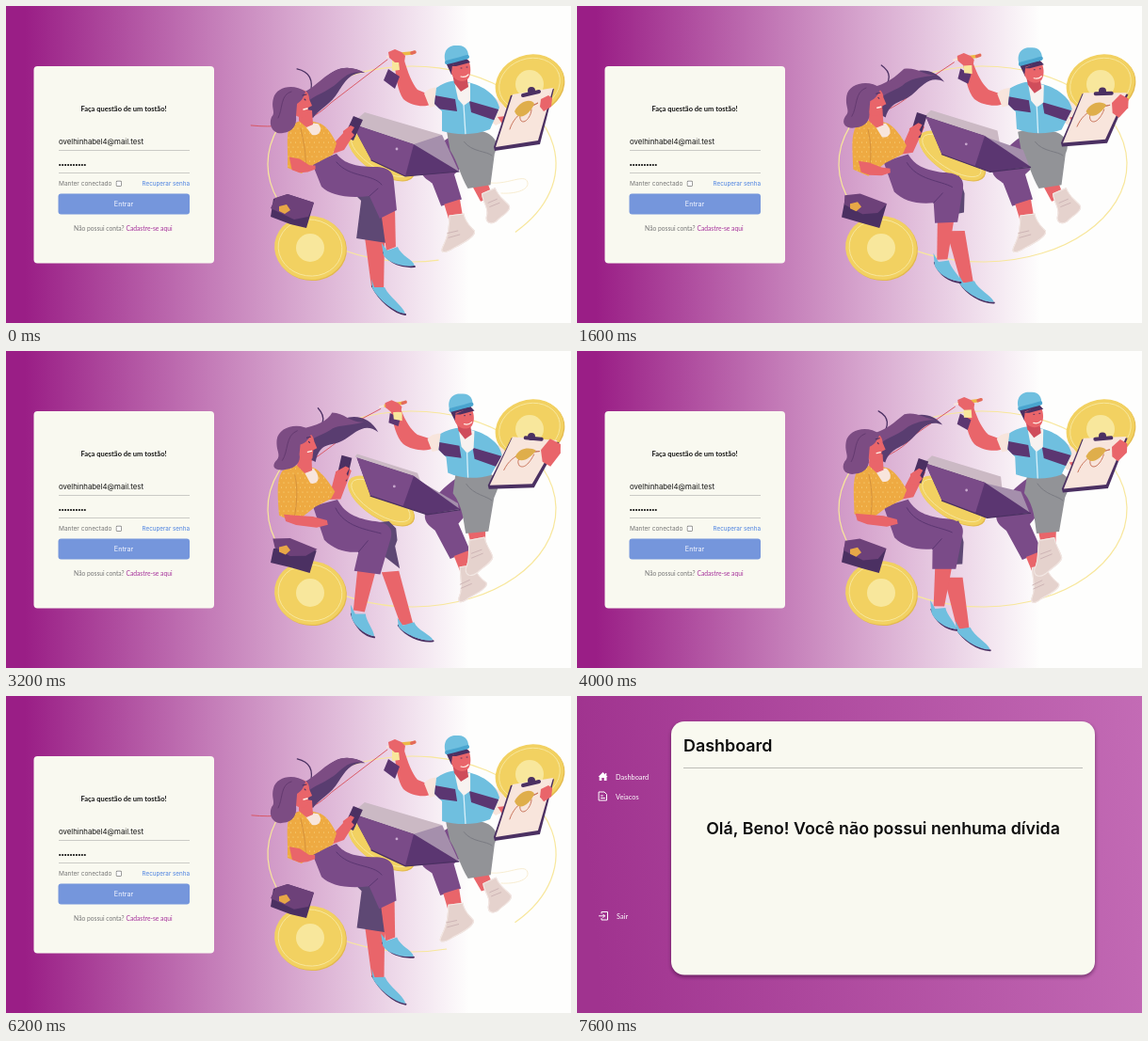
An HTML page with a canvas that plays this animation: 600 px wide and 337 px high, repeating every 8 s.

```html
<!DOCTYPE html>
<html lang="pt-BR">
<head>
<meta charset="utf-8">
<title>Login</title>
<style>
html, body { margin: 0; width: 100%; height: 100%; overflow: hidden; background: #fff; }
canvas { display: block; width: 600px; height: 337px; }
</style>
</head>
<body>
<canvas id="stage" width="600" height="337"></canvas>
<script>
const ctx = document.getElementById('stage').getContext('2d');
const LOOP = 8000, TICK = 200, DASHBOARD_AT = 7200, SWAY = 6000;
const C = {
  paper: '#f9f9f0', skin: '#e9656a', skinDark: '#cf4d5b', hair: '#7c4c83', night: '#4b3062',
  lock: '#593d70', plum: '#7a4b88', plumDark: '#5b3671', dusk: '#5e4874', orange: '#eeaa42',
  gold: '#f2d161', pale: '#f8e79c', sky: '#6fbfdf', cream: '#f8e5dc', gray: '#929397', shoe: '#e5d2cd'
};
const DISPLAY = 'Lato, sans-serif', ROUND = 'Inter, sans-serif';
const NUMBER = /-?[\d.]+/g;

// Cosine swing between 0 and 1, reaching 1 at `peak`; a higher `rest` lingers near 0.
const swing = (t, peak, rest = 1) => ((1 + Math.cos((t - peak) / SWAY * 2 * Math.PI)) / 2) ** rest;

// Blends two path strings that share one structure.
function morph(a, b, p) {
  const ends = b.match(NUMBER);
  let i = 0;
  return new Path2D(a.replace(NUMBER, n => +n + (ends[i++] - n) * p));
}

let pose = 0;
function fill(color, a, b = a) {
  const path = morph(a, b, pose);
  ctx.fillStyle = color;
  ctx.fill(path);
  return path;
}
function line(color, width, a, b = a) {
  ctx.strokeStyle = color;
  ctx.lineWidth = width;
  ctx.lineCap = ctx.lineJoin = 'round';
  ctx.stroke(morph(a, b, pose));
}
function inside(path, draw) {
  ctx.save();
  ctx.clip(path);
  draw();
  ctx.restore();
}
function oval(color, x, y, rx, ry = rx, turn = 0, stroke = 0) {
  ctx.beginPath();
  ctx.ellipse(x, y, rx, ry, turn, 0, 7);
  if (stroke) {
    ctx.strokeStyle = color;
    ctx.lineWidth = stroke;
    ctx.stroke();
  } else {
    ctx.fillStyle = color;
    ctx.fill();
  }
}
function box(color, x, y, w, h, r = 0) {
  ctx.beginPath();
  ctx.roundRect(x, y, w, h, r);
  ctx.fillStyle = color;
  ctx.fill();
}
function text(str, x, y, size, color, family, weight = 400, align = 'left') {
  ctx.font = `${weight} ${size}px ${family}`;
  ctx.textAlign = align;
  ctx.fillStyle = color;
  ctx.fillText(str, x, y);
}
function backdrop(x0, y0, x1, y1, from, to) {
  const g = ctx.createLinearGradient(x0, y0, x1, y1);
  g.addColorStop(0, from);
  g.addColorStop(1, to);
  box(g, 0, 0, 600, 337);
}

function coin(x, y, rx, ry, turn, mark) {
  oval('#e3b94d', x + 1, y + 1, rx, ry, turn);
  oval(C.gold, x, y, rx, ry, turn);
  oval(C.pale, x, y, rx - 4, ry - 4, turn, 1);
  if (mark) oval(C.pale, x, y, mark);
}

function orbit() {
  const gap = .62 * Math.max(0, 1 - pose * 4);
  ctx.strokeStyle = C.pale;
  ctx.lineWidth = 1.2;
  ctx.beginPath();
  ctx.ellipse(431, 168, 153, 104, 0, .77 + gap, .77 + Math.PI * 2);
  ctx.stroke();
  if (gap) line('#f5e6bd', .7, 'M505 185C525 196 552 175 554 188C555 196 540 200 526 199');
}

function thread() {
  line('#d9505a', .9,
    'M405 57L345 103C330 117 310 132 260 127',
    'M397 62C375 72 370 85 350 97C330 117 310 132 260 127');
}

function sneaker(a, b) {
  const path = fill(C.shoe, a, b);
  inside(path, () => line('#f3e8e4', 2, a, b));
}

function manLegs() {
  fill(C.plum,
    'M483 133C465 140 448 157 441 171C438 181 447 184 452 188L460 211L482 204L475 178L506 151Z',
    'M487 130C470 139 453 157 446 170C443 181 449 186 456 191L473 222L494 213L481 184L508 151Z');
  fill(C.skin, 'M463 209L480 204L483 224L468 227Z', 'M477 219L492 213L498 236L485 238Z');
  sneaker('M468 221L484 219C486 229 491 232 495 237C497 243 485 250 473 256C464 262 456 263 459 256C463 247 467 243 468 221Z',
    'M483 230L498 228C501 238 507 243 512 247C515 252 504 258 493 264C486 270 481 269 483 262C487 252 484 245 483 230Z');
  line('#cbb2b3', .9, 'M466 240L477 238M467 245L479 242', 'M484 249L494 244M485 253L496 248');
  fill(C.skin, 'M494 188L511 186L519 202L506 207Z', 'M489 187L509 187L508 209L494 212Z');
  sneaker('M508 199L522 192C527 203 534 205 539 211C541 217 532 221 525 228C518 232 513 228 515 221C517 213 509 208 508 199Z',
    'M490 201L507 198C509 209 514 213 515 220C514 226 504 231 498 237C490 243 484 239 485 232C490 222 488 213 490 201Z');
  line('#cbb2b3', .9, 'M516 208L525 204M518 212L528 208', 'M492 216L503 212M492 221L504 216');
  fill(C.gray,
    'M466 135C482 131 503 132 512 137C522 143 522 151 519 157L515 190L491 194C482 181 479 167 471 154Z',
    'M479 127C494 123 512 126 519 133C528 140 520 150 518 157L512 192L488 194C486 181 486 165 475 151Z');
  line('#7a7b82', 1, 'M486 145C494 156 511 154 516 159', 'M489 141C497 153 511 154 516 159');
}

function manTorso() {
  fill(C.skin,
    'M449 94L437 89C431 82 427 71 423 58L413 58C413 73 416 91 422 99C431 107 446 108 452 104Z',
    'M453 94L437 89C429 83 424 75 419 63L408 63C411 77 414 92 422 99C431 106 449 107 454 103Z');
  fill(C.cream, 'M460 87C452 86 447 89 444 93L450 108L463 104Z',
    'M466 88C457 87 451 89 448 94L453 107L467 104Z');
  fill(C.cream, 'M507 92C522 97 532 105 534 120L520 127L508 116Z',
    'M512 95C526 100 535 108 535 119L523 127L510 117Z');
  const vest = fill(C.sky,
    'M457 87C464 82 476 76 490 81C508 85 521 95 524 108L514 131C498 138 477 137 463 133L463 112L455 104Z',
    'M462 88C471 83 485 79 495 84C511 88 525 98 527 111L515 132C500 136 485 136 470 129L468 113L460 105Z');
  inside(vest, () => {
    fill(C.plumDark, 'M450 94L477 99L479 112L450 108Z', 'M455 96L482 101L484 114L455 110Z');
    fill(C.plumDark, 'M492 101L530 112L526 124L494 113Z', 'M496 103L533 114L529 126L498 115Z');
    fill('#f7f2f0', 'M476 80L493 82L493 101L486 106L480 99Z', 'M481 82L498 85L497 104L490 109L484 102Z');
    line('#d8f0fa', 1.3, 'M486 105L488 137', 'M490 108L491 137');
  });
}

function manHead() {
  fill(C.skinDark, 'M474 72L489 72L491 86L483 91L476 82Z', 'M479 75L493 75L495 89L488 94L481 85Z');
  fill(C.night, 'M467 60L490 53L486 68L473 73Z', 'M472 64L495 57L491 72L478 76Z');
  fill(C.skin, 'M474 63L491 57C494 65 494 72 491 77C485 83 475 79 473 71Z',
    'M478 66L495 61C498 69 498 75 495 80C489 86 479 82 477 74Z');
  fill(C.night, 'M472 64L489 56L493 60L478 64Z', 'M477 68L494 60L498 64L483 68Z');
  fill(C.sky, 'M467 60C463 48 470 41 479 42C488 41 492 48 491 56Z',
    'M472 64C468 52 475 45 484 46C493 45 497 51 496 59Z');
  line('#4aa5cf', 4, 'M468 60C476 58 484 56 490 54', 'M473 63C481 61 489 59 495 57');
  line(C.night, .9, 'M483 66L484 66M489 65L490 65', 'M487 69L488 69M493 68L494 68');
  line('#fff3ea', 1.2, 'M483 75C486 76 489 75 491 73', 'M487 78C490 79 493 78 495 76');
}

function manTools() {
  fill(C.plumDark, 'M406 67L418 75L413 88L401 79Z', 'M408 66L419 71L417 79L407 76Z');
  fill(C.pale, 'M410 57L417 59L418 68L410 69Z', 'M411 64L421 66L421 75L412 73Z');
  line('#edb946', 3.5, 'M409 52L431 50', 'M402 59L419 56');
  line('#e46b59', 3.5, 'M431 50L434 49', 'M420 56L423 55');
  line(C.cream, 2, 'M405 54L408 53', 'M396 60L400 59');
  fill(C.skin, 'M406 49L413 46L420 49L424 53L423 60L413 60L407 55Z',
    'M402 56L409 53L416 56L420 60L419 65L409 66L403 61Z');

  fill(C.skin, 'M522 118L531 117L538 124L538 130L529 128Z', 'M524 119L533 117L540 125L538 132L529 129Z');
  fill(C.night, 'M536 95L582 88L567 147L519 154L518 150Z', 'M537 92L588 98L560 145L512 146L511 142Z');
  fill(C.cream, 'M538 94L581 87L565 143L520 150Z', 'M538 91L586 96L558 141L513 142Z');
  line('#c9765d', 1, 'M535 131C541 112 559 107 565 103C554 108 542 114 547 122C551 126 558 117 558 110',
    'M528 126C538 106 556 107 567 107C553 108 539 113 545 122C551 126 557 117 561 110');
  fill('#dfae4b', 'M540 112C546 100 558 98 561 104C557 114 545 124 540 112Z',
    'M541 112C546 102 557 103 563 106C557 114 546 121 541 112Z');
  line(C.night, 4, 'M549 95L566 91', 'M552 92L569 94');
  oval(C.night, 558, 90 + pose, 4);
  fill(C.skin, 'M568 99L576 95L580 98L579 107L571 112L567 107Z',
    'M568 106L578 93L590 99L590 109L579 124L570 119Z');
}

function laptop() {
  fill('#cbb9c4', 'M381 113L463 137L456 165L433 149L366 126Z', 'M372 109L434 129L451 172L433 131L371 111Z');
  fill('#a58fac', 'M433 147L463 137L481 176L446 178Z', 'M431 132L482 165L481 169L448 172Z');
  const lid = fill(C.plumDark, 'M367 125L433 147L481 176L424 181L388 164Z', 'M373 112L433 131L482 167L450 173L387 153Z');
  inside(lid, () => fill(C.plum, 'M367 125L433 147L424 181L388 164Z', 'M373 112L433 131L421 164L387 153Z'));
  line(C.night, 1.2, 'M388 164L424 181L481 176', 'M387 153L450 173L482 168');
  oval('#c8a8ce', 415 - 3 * pose, 152 - 9 * pose, 1.4);
}

function pump(a, b, sole, soleB) {
  line(C.night, 2, sole, soleB);
  fill(C.sky, a, b);
}

function womanLegs(nearPose, farPose) {
  pose = farPose;
  fill(C.skin, 'M381 246L402 248L401 301L388 299Z', 'M401 234L419 232L436 289L423 291Z');
  pump('M388 290L391 299L402 299C407 310 420 317 424 327C411 326 393 309 389 300Z',
    'M419 283L425 291L437 287C441 296 454 299 457 305C444 308 424 298 420 292Z',
    'M389 298C396 312 411 326 424 328', 'M420 291C427 301 443 308 457 306');
  fill(C.dusk, 'M360 190L404 180L407 218L403 252L372 247L377 207Z',
    'M360 185L407 181C415 185 417 195 418 203L423 234L395 241L380 205Z');
  pose = nearPose;
  fill(C.skin, 'M398 217L413 212L414 256L404 260Z', 'M373 229L393 231L380 278L368 276Z');
  pump('M399 252L405 260L416 256C420 266 432 269 434 276C420 278 405 272 401 265Z',
    'M365 270L370 280L381 280C381 287 390 298 390 304C379 302 368 292 366 283Z',
    'M401 262C408 274 421 278 434 277', 'M366 280C370 294 379 303 390 305');
  fill(C.plum,
    'M325 167L351 157C358 166 367 170 388 171C407 170 412 177 412 188L415 217L397 226L386 202C362 205 344 201 335 192Z',
    'M326 165L352 158C359 171 368 177 389 181C407 182 412 190 408 201L397 238L369 234L374 214C360 215 348 211 338 201Z');
  line(C.plumDark, 1, 'M351 166C365 183 390 178 399 190M386 202L395 194',
    'M350 167C359 187 383 190 398 194M374 214L384 202');
}

function dots() {
  for (let y = 120; y < 184; y += 5)
    for (let x = 285 + y % 2 * 2.5; x < 360; x += 5) oval('#f8d887', x, y, .6);
}

function forearm() {
  fill(C.skin, 'M301 160L312 162L322 169L328 169L328 173L320 176L312 177L304 174Z',
    'M295 174L307 175L326 176L341 180L342 185L330 188L308 185L297 181Z');
}

function womanTorso() {
  fill(C.skin, 'M337 142L349 145L360 133L368 126L373 131L359 153L345 158Z',
    'M332 135L345 147L349 128L360 120L366 127L355 158L341 158Z');
  const jacket = fill(C.orange,
    'M301 128L316 120L334 125C342 129 347 138 351 146L347 158L326 169L314 178L299 172C300 152 297 140 301 128Z',
    'M293 127L312 120L328 125C335 130 344 141 349 150L345 157L329 165L306 183L289 175C287 151 286 136 293 127Z');
  inside(jacket, dots);
  line('#cf8b39', .8, 'M313 130C317 148 319 160 318 170', 'M306 132C310 148 307 164 305 178');
  fill(C.cream, 'M315 124L331 125C338 131 332 139 325 137Z', 'M314 124L326 125C336 136 330 143 323 141Z');
  fill(C.skin, 'M311 109L325 111L326 126L319 129L311 122Z', 'M310 105L324 108L325 127L317 130L309 122Z');
}

function womanHair() {
  fill(C.lock,
    'M312 96C327 93 334 77 349 69C360 63 372 66 381 71C366 70 360 80 353 91C345 105 332 110 326 119C318 116 314 108 312 96Z',
    'M312 84C330 80 338 91 350 80C363 65 387 68 397 88C383 76 373 87 361 94C346 103 334 92 329 118C316 112 311 99 312 84Z');
  line(C.night, 1.3, 'M309 67C322 70 327 78 323 94', 'M334 60C342 70 341 80 321 91');
  fill(C.hair,
    'M310 94C326 90 334 76 349 69C360 63 372 66 381 71C364 67 357 78 348 85C335 94 325 96 315 106Z',
    'M311 82C332 78 342 74 346 65C360 66 365 78 380 76C362 82 350 78 344 84C332 91 323 91 315 104Z');
}

function womanHead() {
  fill(C.skin, 'M306 91C316 86 322 91 322 99L325 106L321 108L320 116C313 122 304 116 303 108Z',
    'M311 87C321 83 327 88 328 96L331 103L327 105L326 114C317 119 309 112 308 103Z');
  fill(C.hair,
    'M318 91C305 82 287 86 284 98C281 109 287 113 282 118C278 128 285 137 294 135C305 134 309 126 308 117L309 104C314 101 316 97 318 91Z',
    'M326 85C313 74 290 79 288 94C287 107 294 110 287 117C281 124 288 127 297 125C308 124 314 117 312 109L313 99C319 97 323 93 326 85Z');
  line('#643a70', 1, 'M303 91C291 94 294 110 289 119', 'M310 84C297 89 301 106 294 116');
  line(C.night, 1.1, 'M317 99L318 100M315 95L319 94', 'M322 96L323 97M320 92L324 91');
  line('#fff3ea', 1.4, 'M316 110L320 109', 'M321 107L325 106');
}

function phone() {
  fill(C.night, 'M369 117L379 121L369 143L359 139Z', 'M355 110L366 113L361 138L350 135Z');
  fill(C.skin, 'M358 133L366 127L370 129L367 134L370 137L365 143L358 143Z',
    'M349 128L360 122L364 124L361 130L363 134L358 140L350 139Z');
}

function purse() {
  fill(C.night, 'M284 205L299 200L327 209L319 236L302 232L281 224Z',
    'M284 211L302 204L330 213L323 236L303 230L281 225Z');
  fill('#6d4179', 'M286 204L299 200L327 209L321 224L306 227L281 215Z',
    'M283 199L302 199L331 211L318 217L301 217L286 208Z');
  fill('#e7a747', 'M290 213L298 211L302 217L296 221L290 218Z', 'M290 208L298 206L302 211L297 216L290 213Z');
}

function illustration(t) {
  const drift = swing(t, 2900), body = swing(t, 2700, 1.6);
  pose = drift;
  orbit();
  pose = body;
  thread();
  coin(556, 83, 37, 31, -.35, 15);
  coin(323, 257, 38, 34, .15, 15);
  coin(398, 159, 40, 18, .57);
  pose = swing(t, 3800);
  manLegs();
  pose = body;
  manTorso();
  manHead();
  manTools();
  laptop();
  womanLegs(drift, body);
  pose = body;
  womanHair();
  womanTorso();
  pose = swing(t, 3400);
  forearm();
  pose = body;
  womanHead();
  phone();
  purse();
}

function loginCard() {
  box(C.paper, 29.5, 64, 191.5, 209.5, 4);
  text('Faça questão de um tostão!', 125, 112, 7.5, '#151515', DISPLAY, 700, 'center');
  text('ovelhinhabel4@mail.test', 56, 147, 7.8, '#111', ROUND);
  for (let i = 0; i < 10; i++) oval('#111', 57.2 + i * 2.95, 169, 1.1);
  box('#bcbcb8', 56, 153, 139, .8);
  box('#bcbcb8', 56, 177, 139, .8);
  text('Manter conectado', 56, 191, 6.55, '#777', ROUND);
  box('#777', 116.8, 185.8, 6, 6, 1.2);
  box('#fff', 117.5, 186.5, 4.6, 4.6, .7);
  text('Recuperar senha', 195, 191, 6.3, '#4a80e0', ROUND, 400, 'right');
  box('#7596dc', 55.5, 199.5, 139.5, 22, 3);
  text('Entrar', 125, 213, 7.2, '#f5f7ff', ROUND, 400, 'center');
  text('Não possui conta?', 125.5, 238.5, 6.7, '#777', DISPLAY, 400, 'right');
  text('Cadastre-se aqui', 127.5, 238.5, 6.7, '#a5309a', DISPLAY);
}

function sidebar() {
  fill('#fff', 'M22.5 86L27.5 81L30 83.4V82H31.3V84.7L32.7 86H31.5V90H28.8V87H26.3V90H23.7V86Z');
  line('#fff', 1, 'M23.5 102H29L31.5 104.5V111H23.5ZM25.5 106H27.5M25.5 108.5H29.5');
  line('#fff', 1, 'M26 231V229.5H32.5V238H26V236.5M23.5 233.8H29.5M27.7 232L29.5 233.8L27.7 235.6');
  text('Dashboard', 41, 89, 7.4, '#fff', DISPLAY);
  text('Veiacos', 41, 110, 7.4, '#fff', DISPLAY);
  text('Sair', 42, 237, 7.4, '#fff', DISPLAY);
}

function dashboard() {
  backdrop(0, 60, 600, 0, '#a0338f', '#c36bb5');
  sidebar();
  ctx.save();
  ctx.shadowColor = 'rgba(40,0,40,.5)';
  ctx.shadowBlur = 4;
  ctx.shadowOffsetY = 2;
  box(C.paper, 100, 27, 450, 269.5, 14);
  ctx.restore();
  text('Dashboard', 113, 59, 17.9, '#0c0c0c', ROUND, 600);
  box('#bdbdb8', 113, 76, 424, 1);
  text('Olá, Beno! Você não possui nenhuma dívida', 325, 147, 17.8, '#0c0c0c', ROUND, 600, 'center');
}

function render(now) {
  const t = Math.floor(now % LOOP / TICK) * TICK;
  if (t >= DASHBOARD_AT) {
    dashboard();
  } else {
    backdrop(20, 0, 492, 0, '#9a1e86', '#fefefd');
    illustration(t);
    loginCard();
  }
  requestAnimationFrame(render);
}
requestAnimationFrame(render);
</script>
</body>
</html>
```
